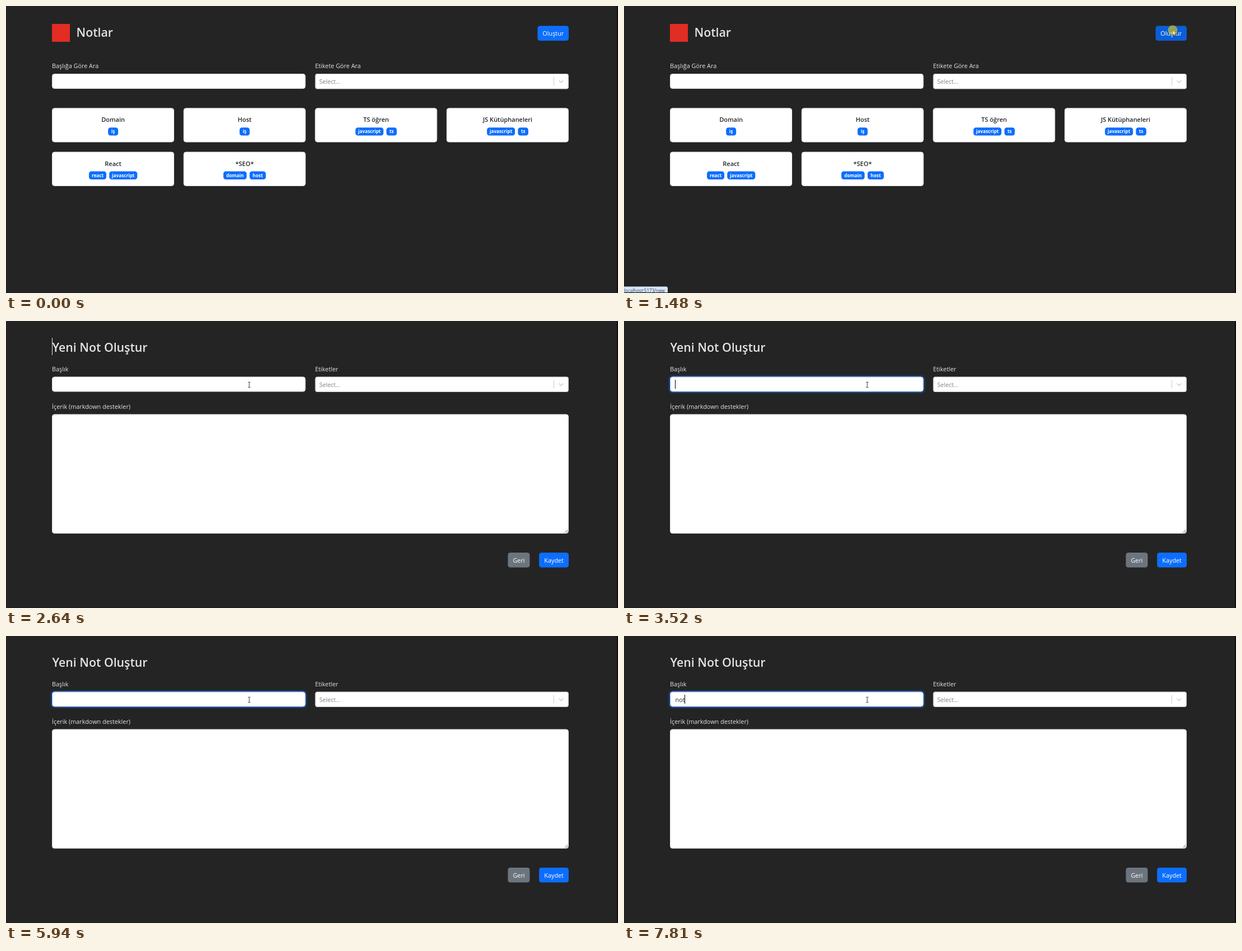
Write an HTML page that moves like this. It is 1092 px wide and 513 px high and loops after 8000 ms.

```html
<!DOCTYPE html>
<html lang="tr">
<head>
<meta charset="utf-8">
<title>Notlar</title>
<style>
html, body { margin: 0; width: 100%; height: 100%; overflow: hidden; background: #242424; }
svg { display: block; width: 100vw; height: 100vh; font: 10.85px "Open Sans", "Noto Sans", sans-serif; fill: #e3e3e3; }
.h1 { font-size: 21.3px; font-weight: 600; }
.mid { text-anchor: middle; }
.btn { text-anchor: middle; fill: #fff; }
.title { font-size: 11px; font-weight: 600; text-anchor: middle; fill: #212529; }
.badge { font-size: 8.2px; font-weight: 700; text-anchor: middle; fill: #fff; }
.hint { font-size: 10.6px; fill: #808080; }
.box { fill: #fff; stroke: #dee2e6; }
.blue { fill: #0d6efd; }
.line { fill: none; stroke: #ccc; }

/* every track shares one 8 s clock */
.home, .form, .status, .ripple, .arrow, .beam, .mark, .caret, .upper, .lower, .typed tspan {
  animation: 8s step-end infinite;
}
.home { animation-name: home; }
.form { animation-name: form; }
.status { animation: status 8s linear infinite; }
.ripple { animation-name: ripple; }
.arrow { animation-name: arrow; }
.beam { animation-name: beam; }
.mark { animation-name: mark; }
.caret { animation-name: caret; }
.upper { animation-name: upper; }
.lower { animation-name: lower; }
.typed .n { animation-name: key-n; }
.typed .o { animation-name: key-o; }
.typed .t { animation-name: key-t; }
.pointer { animation: pointer 8s linear infinite; }
.create { animation: create 8s linear infinite; }
.lift { animation: lift 8s linear infinite; }
.focus { animation: focus 8s linear infinite; }

@keyframes home { 0% { opacity: 1 } 19.375%, to { opacity: 0 } }
@keyframes form { 0% { opacity: 0 } 19.375%, to { opacity: 1 } }
@keyframes status { 0%, 13.8% { opacity: 0 } 15.5%, 22% { opacity: 1 } 23.5%, to { opacity: 0 } }
@keyframes ripple {
  0% { opacity: 0 } 17.25% { opacity: 1 } 19.375% { opacity: 0 }
  41.5% { opacity: 1 } 43.25%, to { opacity: 0 }
}
@keyframes arrow { 0% { opacity: 0 } 3.875% { opacity: 1 } 27.9%, to { opacity: 0 } }
@keyframes beam { 0% { opacity: 0 } 27.9%, to { opacity: 1 } }
@keyframes pointer {
  0%, 3.875% { transform: translate(154px, 386px) }
  5% { transform: translate(400px, 360px) }
  6.5% { transform: translate(690px, 318px) }
  7.5% { transform: translate(880px, 228px) }
  8.5% { transform: translate(988px, 99.5px) }
  9.5% { transform: translate(985px, 84px) }
  11% { transform: translate(981px, 60px) }
  13.1% { transform: translate(979px, 43px) }
  21.75% { transform: translate(979px, 43px); animation-timing-function: ease-in-out }
  30.5%, to { transform: translate(434px, 114px) }
}
@keyframes create { 0%, 11.9% { fill: #0d6efd } 13.1%, to { fill: #0b5ed7 } }
@keyframes lift {
  0%, 6.6% { transform: none }
  7.7% { transform: translate(3px, -3px) }
  8.5% { transform: translate(1.4px, -1.2px) }
  9.5%, to { transform: none }
}
@keyframes focus { 0%, 41.5% { opacity: 0 } 44%, to { opacity: 1 } }
@keyframes mark {
  0% { opacity: 0 } 19.375% { opacity: 1 } 26.75% { opacity: 0 }
  33% { opacity: 1 } 39.125%, to { opacity: 0 }
}
@keyframes caret {
  0% { opacity: 0; transform: none }
  42.375% { opacity: 1; transform: none }
  48.625% { opacity: 0; transform: none }
  54.875% { opacity: 1; transform: none }
  61% { opacity: 0; transform: none }
  68% { opacity: 1; transform: none }
  74.25% { opacity: 0; transform: none }
  75.875% { opacity: 1; transform: translateX(7px) }
  82.75% { opacity: 0; transform: translateX(7px) }
  84.375% { opacity: 1; transform: translateX(13px) }
  90.625% { opacity: 0; transform: translateX(13px) }
  96.875% { opacity: 1; transform: translateX(13px) }
  97.625%, to { opacity: 1; transform: translateX(17px) }
}
@keyframes upper { 0% { opacity: 0 } 56.375% { opacity: 1 } 71.125%, to { opacity: 0 } }
@keyframes lower { 0% { opacity: 0 } 75.875% { opacity: 1 } 90.625%, to { opacity: 0 } }
@keyframes key-n { 0% { visibility: hidden } 75.875%, to { visibility: visible } }
@keyframes key-o { 0% { visibility: hidden } 84.375%, to { visibility: visible } }
@keyframes key-t { 0% { visibility: hidden } 97.625%, to { visibility: visible } }
</style>
</head>
<body>
<svg viewBox="0 0 1092 513">
  <defs>
    <rect id="input" class="box" x="82.5" y=".5" width="451.5" height="26" rx="4"/>
    <g id="select">
      <rect x="552" y=".5" width="451.5" height="26.5" rx="3" fill="#fff" stroke="#ccc"/>
      <text class="hint" x="559" y="18.2">Select...</text>
      <path class="line" d="M977.5 6v15"/>
      <path class="line" stroke-width="1.4" stroke-linecap="round" d="M987 12.5l3.5 3.4 3.5-3.4"/>
    </g>
    <g id="key">
      <path d="M498 0h91v36.5a3 3 0 0 1-3 3h-85a3 3 0 0 1-3-3z" fill="#e6e6e6"/>
      <rect x="525.8" y="-20" width="34.6" height="37.2" rx="3.5" fill="none" stroke="#000" stroke-width="3.6"/>
    </g>
  </defs>
  <rect width="1092" height="513" fill="#242424"/>

  <g class="home">
    <rect x="82" y="32" width="32" height="32" fill="#e12d24"/>
    <text class="h1" x="125.5" y="54.8">Notlar</text>
    <rect class="create" x="948.5" y="35.5" width="55.5" height="26.5" rx="4.3"/>
    <text class="btn" x="976.3" y="52.8">Oluştur</text>
    <text x="82" y="111.3">Başlığa Göre Ara</text>
    <text x="551.5" y="111.3">Etikete Göre Ara</text>
    <use href="#input" y="121"/>
    <use href="#select" y="121"/>
    <g id="cards"></g>
  </g>

  <g class="form">
    <text class="h1" x="82.5" y="54.8">Yeni Not Oluştur</text>
    <rect class="mark" x="82" y="30" width="1" height="31"/>
    <text x="82" y="90">Başlık</text>
    <text x="551.5" y="90">Etiketler</text>
    <use href="#input" y="99.5"/>
    <use href="#select" y="99.5"/>
    <g class="focus" fill="none">
      <rect x="80.6" y="98.1" width="455.3" height="29.8" rx="5.5" stroke="#0d6efd" stroke-opacity=".28" stroke-width="2.9"/>
      <rect x="82.5" y="100" width="451.5" height="26" rx="4" stroke="#86b7fe"/>
    </g>
    <text class="typed" x="91.5" y="117.7" fill="#212529"><tspan class="n">n</tspan><tspan class="o">o</tspan><tspan class="t">t</tspan></text>
    <rect class="caret" x="91" y="105" width="1" height="16" fill="#000"/>
    <text x="82" y="157">İçerik (markdown destekler)</text>
    <rect class="box" x="82.5" y="167" width="921" height="212.5" rx="4"/>
    <path d="M997 378.5l5.5-5.5M1000 378.5l2.5-2.5" stroke="#555" stroke-width=".9"/>
    <rect x="895.5" y="414" width="39" height="26.5" rx="4.3" fill="#6c757d"/>
    <text class="btn" x="915" y="431.6">Geri</text>
    <rect class="blue" x="951.2" y="414" width="52.8" height="26.5" rx="4.3"/>
    <text class="btn" x="977.6" y="431.6">Kaydet</text>
  </g>

  <g font-weight="700" fill="#000" class="mid">
    <g class="upper"><use href="#key"/><text x="543" y="10" font-size="17" fill="#000">A</text></g>
    <g class="lower"><use href="#key"/><text x="543" y="7.6" font-size="16" fill="#000">a</text></g>
  </g>

  <g class="status">
    <path d="M0 501.5h75a3 3 0 0 1 3 3V513H0z" fill="#d7e5fb"/>
    <text x="0" y="511.8" font-size="8.05" fill="#3a4656">localhost:5173/new</text>
  </g>

  <rect x="1090" width="2" height="513" fill="#0c0c0c"/>
  <rect y="512" width="1092" height="1" fill="#1c1c1c"/>

  <g class="pointer">
    <path class="arrow" d="M0 0v9.2l2.2-2 1.6 3.6 1.6-.7-1.6-3.5h2.9z" fill="#fff" stroke="#000" stroke-width=".6"/>
    <path class="beam" d="M-2.2-4.7H-.6L0-4.2.6-4.7H2.2M0-4.2V4.2M-2.2 4.7H-.6L0 4.2.6 4.7H2.2" fill="none" stroke="#222" stroke-width=".9"/>
    <circle class="ripple" r="8.5" fill="#ffdc00" fill-opacity=".55"/>
  </g>
</svg>
<script>
// tags as [text, badge width]
const work = ["iş", 18], js = ["javascript", 50], ts = ["ts", 18.5];
const cards = [
  ["Domain", [work]],
  ["Host", [work]],
  ["TS öğren", [js, ts]],
  ["JS Kütüphaneleri", [js, ts], "lift"],
  ["React", [["react", 31], js]],
  ["*SEO*", [["domain", 41.5], ["host", 29]]]
];
const GAP = 5.3;

function card([title, tags, cls = ""], i) {
  const x = 82.5 + (i % 4) * 234.65, y = 182.8 + Math.floor(i / 4) * 78.3, mid = x + 108.6;
  let left = mid - (tags.reduce((sum, tag) => sum + tag[1] + GAP, -GAP)) / 2;
  const badges = tags.map(([text, w]) => {
    const out = `<rect class="blue" x="${left}" y="${y + 34.4}" width="${w}" height="14.4" rx="4.3"/>
      <text class="badge" x="${left + w / 2}" y="${y + 44.5}">${text}</text>`;
    left += w + GAP;
    return out;
  }).join("");
  return `<g class="${cls}"><rect class="box" x="${x}" y="${y}" width="217" height="60.3" rx="4"/>
    <text class="title" x="${mid}" y="${y + 24.6}">${title}</text>${badges}</g>`;
}
document.getElementById("cards").innerHTML = cards.map(card).join("");
</script>
</body>
</html>
```
